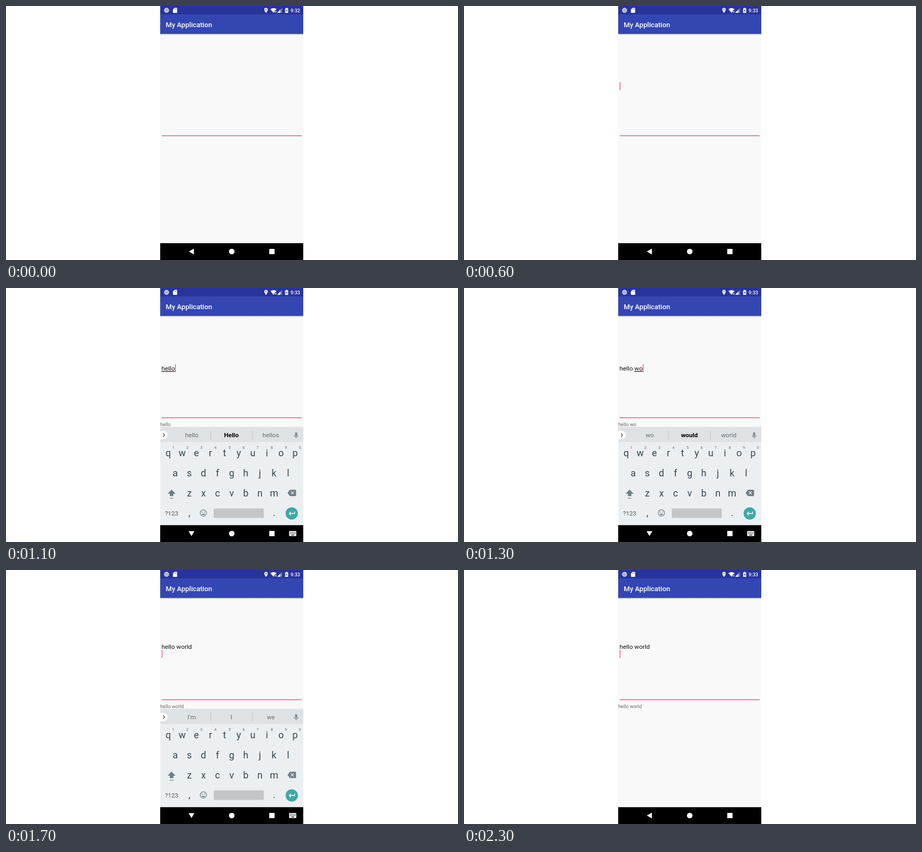
Recreate the animation shown at these times as an HTML page. Size 853 by 480 pixels, loop 2.4 s.

```html
<!DOCTYPE html>
<html lang="en">
<head>
<meta charset="utf-8">
<title>Text field demo</title>
<style>
  html, body { margin: 0; width: 100%; height: 100%; overflow: hidden; background: #fff; }
  svg { display: block; width: 853px; height: 480px; font-family: Roboto, sans-serif; }
  text { white-space: pre; }
  .mid { text-anchor: middle; }
  .key { font-size: 18px; fill: #37474f; }
  .digit { font-size: 7px; fill: #59666d; }
  .suggestion { font-size: 11.8px; fill: #626d73; }
  .suggestion.best { font-weight: 700; fill: #000; }
  .composing { text-decoration: underline; }
</style>
</head>
<body>
<svg viewBox="0 0 853 480">
  <defs>
    <linearGradient id="shade" x2="0" y2="1">
      <stop stop-color="#8b90ae"/>
      <stop offset=".4" stop-color="#d9dadf"/>
      <stop offset="1" stop-color="#f9f9f9"/>
    </linearGradient>
    <clipPath id="screen"><rect x="291" width="270" height="480"/></clipPath>
  </defs>

  <g clip-path="url(#screen)">
    <rect x="291" width="270" height="480" fill="#f9f9f9"/>
    <rect x="291" width="270" height="53" fill="#3446b1"/>
    <rect x="291" width="270" height="15.75" fill="#283499"/>
    <rect x="291" y="52.5" width="270" height="3" fill="url(#shade)"/>
    <text x="301.5" y="39.6" font-size="13.125" font-weight="500" fill="#fff">My Application</text>

    <!-- Status bar -->
    <g fill="#fff">
      <circle cx="303" cy="8.2" r="3.9" fill="#a9afd2" stroke="#d5d8ec" stroke-width="1.5"/>
      <path d="M318 3.6h4.2q.8 0 .8.8v7.7q0 .8-.8.8h-6.4q-.8 0-.8-.8V6.6z"/>
      <path d="M318.2 5v1.7M319.9 5v1.7M321.5 5v1.7" stroke="#283499" stroke-width=".7"/>
      <path fill-rule="evenodd" d="M490.7 3.5a3.2 3.2 0 0 1 3.2 3.2c0 2.4-3.2 6.3-3.2 6.3s-3.2-3.9-3.2-6.3a3.2 3.2 0 0 1 3.2-3.2zm0 2.1a1.1 1.1 0 1 0 .01 0z"/>
      <path d="M499 5.9Q504.800 2 510.600 5.900L508.800 8.200H507V10.400L504.800 12.800z"/>
      <path d="M507.700 9.300l2.800 3.200m0-3.200l-2.800 3.200" stroke="#fff" stroke-width=".9"/>
      <path d="M521 3.600V12.800H511.800z" opacity=".35"/>
      <path d="M517.600 7V12.800H511.800z"/>
      <path d="M528.600 3.600h2v.9h1.400q.5 0 .5.500v7.500q0 .5-.5.500h-4.800q-.5 0-.5-.5V5q0-.5.5-.5h1.400z"/>
      <path d="M530 5.900l-1.900 3.300h1.200v2.500l1.900-3.400h-1.200z" fill="#283499"/>
      <text id="clock" x="537" y="11.9" font-size="9.19" font-weight="500"></text>
    </g>

    <!-- Text field -->
    <rect x="294" y="244.600" width="264" height="1.300" fill="#b95a74"/>
    <text id="field" x="293.400" font-size="11.81" fill="#111"><tspan id="done"></tspan><tspan id="composing" class="composing"></tspan></text>
    <rect id="cursor" width="1.300" height="15" fill="#f2467f"/>
    <text id="echo" x="291" y="260.500" font-size="9.19" fill="#696969"></text>

    <g id="keyboard">
      <rect x="291" y="262.500" width="270" height="186" fill="#eceff1"/>
      <rect x="291" y="262.500" width="270" height="28.500" fill="#dfe2e4"/>
      <path d="M386.500 270v16M465 270v16" stroke="#c0c5c8"/>
      <path d="M291 270.300h6.500a7.700 7.700 0 0 1 0 15.400H291z" fill="#fff"/>
      <path d="M296.200 274.700l3.300 3.300-3.300 3.300" fill="none" stroke="#4b575d" stroke-width="1.300"/>
      <g fill="none" stroke="#75828a">
        <path d="M547.500 274.200v4" stroke-width="3.600" stroke-linecap="round"/>
        <path d="M544 278a3.500 3.500 0 0 0 7 0M547.500 281.500v2.700" stroke-width="1.100"/>
      </g>
      <g id="suggestions"></g>
      <g id="keys"></g>

      <g fill="#6f7d84">
        <path d="M312.500 381l7.500 7.700h-4.200v4.600h-6.600v-4.600H305z"/>
        <rect x="309.200" y="396.800" width="6.600" height="1.200"/>
        <path d="M535.700 381.200h10.400q1.200 0 1.200 1.200v9.600q0 1.200-1.200 1.200h-10.400l-4.300-6z"/>
        <path d="M537.600 384.500l5.400 5.400m0-5.400l-5.400 5.400" stroke="#eceff1" stroke-width="1.300"/>
        <circle cx="372.500" cy="425.200" r="6" fill="none" stroke="#6f7d84" stroke-width="1.200"/>
        <circle cx="370.300" cy="423.500" r="1"/>
        <circle cx="374.700" cy="423.500" r="1"/>
        <path d="M369.200 426.700h6.600a3.400 3.400 0 0 1-6.600 0z"/>
      </g>
      <text class="mid" x="312.500" y="429.500" font-size="11.700" fill="#4c5960">?123</text>
      <text class="key mid" x="346" y="430.500">,</text>
      <text class="key mid" x="506" y="430.500">.</text>
      <rect x="392" y="416.500" width="94.500" height="18" rx="1.500" fill="#c2c6c9"/>
      <circle cx="539.200" cy="426" r="11.600" fill="#3fa9a6"/>
      <path d="M544.600 422.500v3.700h-10.300m3.300-3.300l-3.300 3.300 3.300 3.300" fill="none" stroke="#fff" stroke-width="1.400"/>
    </g>

    <!-- Navigation bar -->
    <rect x="291" y="448.200" width="270" height="32" fill="#000"/>
    <g fill="#fff">
      <path id="back"/>
      <circle cx="426" cy="464" r="5.300"/>
      <rect x="496.800" y="459" width="10" height="10" rx=".5"/>
      <g id="switcher">
        <rect x="534.300" y="459.300" width="13.500" height="9.400" rx="1.200"/>
        <path d="M536 461.900h10.500M536 464.200h10.500" stroke="#000" stroke-width="1.200" stroke-dasharray="1.200 1.100"/>
        <path d="M538.200 466.800h5.800" stroke="#000" stroke-width="1.100"/>
      </g>
    </g>
  </g>
</svg>

<script>
const LOOP = 2400;
const $ = id => document.getElementById(id);

function addText(parent, x, y, className, content = "") {
  const node = document.createElementNS("http://www.w3.org/2000/svg", "text");
  node.setAttribute("x", x);
  node.setAttribute("y", y);
  node.setAttribute("class", className + " mid");
  node.textContent = content;
  return parent.appendChild(node);
}

const KEY_STEP = 26.63;
[["qwertyuiop", 306, 318], ["asdfghjkl", 319.3, 356], ["zxcvbnm", 346, 394]].forEach(([letters, x, y]) =>
  [...letters].forEach((letter, i) => addText($("keys"), x + i * KEY_STEP, y, "key", letter)));
[..."1234567890"].forEach((digit, i) => addText($("keys"), 315.6 + i * 26.58, 303.5, "digit", digit));
const slots = [350.5, 425.3, 499.7].map(x => addText($("suggestions"), x, 282.2, "suggestion"));

// Each step lists only what changes: time, then new state.
const idle = ["I'm", "I", "we"];
const steps = [
  [0, { clock: "9:32", cursor: false, keyboard: false, text: "", word: "", words: idle }],
  [100, { cursor: true }],
  [200, { cursor: false, clock: "9:33" }],
  [300, { cursor: true }],
  [400, { cursor: false }],
  [600, { cursor: true }],
  [800, { cursor: false, keyboard: true }],
  [900, { cursor: true, word: "h", words: ["h", "have", "how"] }],
  [1000, { word: "hel", words: ["hel", "hello", "help"] }],
  [1100, { word: "hello", words: ["hello", "Hello", "hellos"] }],
  [1200, { text: "hello ", word: "w", words: ["w", "we", "with"] }],
  [1300, { word: "wo", words: ["wo", "would", "world"] }],
  [1400, { word: "worl", words: ["worl", "world", "works"] }],
  [1500, { word: "world", words: ["world", "worlds", "World"] }],
  [1600, { text: "hello world\n", word: "", words: idle, cursor: false }],
  [1700, { cursor: true }],
  [1800, { keyboard: false, cursor: false }],
  [2000, { cursor: true }],
  [2200, { cursor: false }],
  [2300, { cursor: true }]
];
let previous = {};
const states = steps.map(([, change]) => previous = { ...previous, ...change });

function show({ clock, cursor, keyboard, text, word, words }) {
  const newline = text.endsWith("\n");
  $("clock").textContent = clock;
  $("done").textContent = text.replace("\n", "");
  $("composing").textContent = word;
  $("echo").textContent = text.replace("\n", "") + word;
  $("field").setAttribute("y", newline ? 149.2 : 156.2);

  const width = newline || !(text + word) ? 0 : $("field").getComputedTextLength();
  $("cursor").setAttribute("x", 293.8 + width);
  $("cursor").setAttribute("y", newline ? 151.2 : 144);
  $("cursor").style.display = cursor ? "" : "none";

  $("keyboard").style.display = $("switcher").style.display = keyboard ? "" : "none";
  $("back").setAttribute("d", keyboard ? "M344.5 459.6H355.5L350 468.8z" : "M354.6 458.5V469.500L345 464z");
  slots.forEach((slot, i) => {
    slot.textContent = words[i];
    slot.classList.toggle("best", i === 1 && words !== idle);
  });
}

let current = -1;
const start = performance.now();
function tick() {
  const time = Math.max(0, performance.now() - start) % LOOP;
  const index = steps.findLastIndex(([at]) => at <= time);
  if (index !== current) show(states[current = index]);
  requestAnimationFrame(tick);
}
tick();
</script>
</body>
</html>
```
